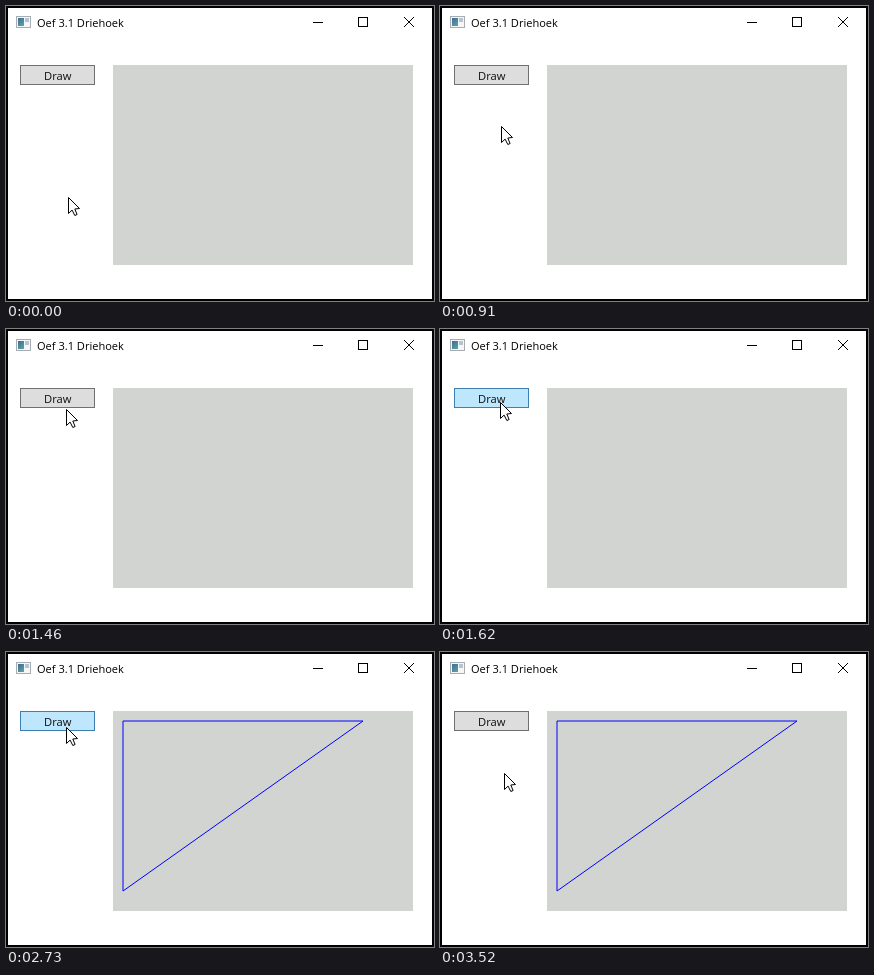
An HTML page with a canvas that plays this animation: 428 px wide and 295 px high, repeating every 4470 ms.

```html
<!DOCTYPE html>
<html lang="nl">
<head>
<meta charset="utf-8">
<title>Driehoek</title>
<style>
html, body { margin: 0; width: 100%; height: 100%; overflow: hidden; background: #fff; }
canvas { display: block; }
</style>
</head>
<body>
<canvas id="stage" width="428" height="295"></canvas>
<script>
const ctx = document.getElementById('stage').getContext('2d');
const LOOP = 4470;
const PRESS = 2110, RELEASE = 2250;
const LEAD = 10; // ms by which steps inside a move may come early
const BUTTON_BOTTOM = 79;

// Pointer moves: from start to end in equal steps, eased by a power
const moves = [
  { start: 620, end: 1070, steps: 7, from: [62, 187], to: [61, 94], power: 0.81 },
  { start: 1150, end: 1620, steps: 7, from: [61, 90], to: [60, 73], power: 1.31 },
  { start: 2730, end: 3200, steps: 7, from: [60, 75], to: [64, 108], power: 0.89 },
  { start: 3290, end: 3520, steps: 4, from: [64, 112], to: [64, 121], power: 0.8 }
];
const REST = [62, 191];

const looks = {
  normal: ['#dddddd', '#707070'],
  hover: ['#bee6fd', '#3c7fb1'],
  pressed: ['#c4e5f6', '#2c628b']
};

function pointerAt(t) {
  const move = moves.filter(m => m.start <= t).pop();
  if (!move) return REST;
  const { start, end, steps, from, to, power } = move;
  const gap = (end - start) / (steps - 1);
  const step = Math.min(steps - 1, Math.floor((t - start + LEAD) / gap));
  const p = (step / (steps - 1)) ** power;
  return from.map((a, i) => Math.round(a + (to[i] - a) * p));
}

function rect(x, y, w, h, color) {
  ctx.fillStyle = color;
  ctx.fillRect(x, y, w, h);
}

function box(x, y, w, h, fill, edge) {
  rect(x, y, w, h, edge);
  rect(x + 1, y + 1, w - 2, h - 2, fill);
}

function line(x1, y1, x2, y2, color) {
  ctx.strokeStyle = color;
  ctx.lineWidth = 1;
  ctx.beginPath();
  ctx.moveTo(x1, y1);
  ctx.lineTo(x2, y2);
  ctx.stroke();
}

function text(str, x, y, size, color) {
  ctx.font = size + 'px "Open Sans", "Noto Sans", sans-serif';
  ctx.fillStyle = color;
  ctx.fillText(str, x, y);
}

function drawIcon() {
  box(10, 10, 15, 12, '#f4f6f7', '#a8adb2');
  const pane = ctx.createLinearGradient(12, 12, 18, 20);
  pane.addColorStop(0, '#3f6c9c');
  pane.addColorStop(1, '#5fa39c');
  rect(12, 12, 6, 8, pane);
  rect(19, 12, 4, 4, '#b4c4d2');
}

function drawWindow() {
  rect(0, 0, 428, 295, '#000');
  rect(2, 2, 424, 291, '#fff');
  drawIcon();
  text('Oef 3.1 Driehoek', 31, 21, 11.05, '#000');
  rect(307, 16, 10, 1, '#000');
  box(352, 11, 10, 10, '#fff', '#000');
  line(398, 11, 408, 21, '#000');
  line(408, 11, 398, 21, '#000');
  rect(107, 59, 300, 200, '#d2d4d2');
}

function drawButton(state) {
  const [fill, edge] = looks[state];
  box(14, 59, 75, 20, fill, edge);
  text('Draw', 38, 74, 11.2, '#111');
}

function drawTriangle() {
  line(117, 69, 357, 69, '#00f');
  line(357, 69, 117, 239, '#00f');
  line(117, 239, 117, 69, '#00f');
}

function drawClick() {
  ctx.fillStyle = 'rgba(255, 242, 60, 0.65)';
  ctx.beginPath();
  ctx.arc(60, 73, 12, 0, Math.PI * 2);
  ctx.fill();
}

function drawPointer(x, y) {
  const outline = [[0, 0], [0, 16], [3.6, 12.6], [6.3, 18], [8.6, 17], [6.3, 11.5], [11, 11]];
  ctx.beginPath();
  outline.forEach(([dx, dy]) => ctx.lineTo(x + dx + 0.5, y + dy + 0.5));
  ctx.closePath();
  ctx.fillStyle = '#fff';
  ctx.fill();
  ctx.strokeStyle = '#000';
  ctx.lineWidth = 1;
  ctx.stroke();
}

function draw(t) {
  const [x, y] = pointerAt(t);
  const pressed = t >= PRESS && t < RELEASE;
  drawWindow();
  drawButton(pressed ? 'pressed' : y < BUTTON_BOTTOM ? 'hover' : 'normal');
  if (t >= RELEASE) drawTriangle();
  if (pressed) drawClick();
  drawPointer(x, y);
}

const start = performance.now();
function tick() {
  draw((performance.now() - start) % LOOP);
  requestAnimationFrame(tick);
}
tick();
</script>
</body>
</html>
```
